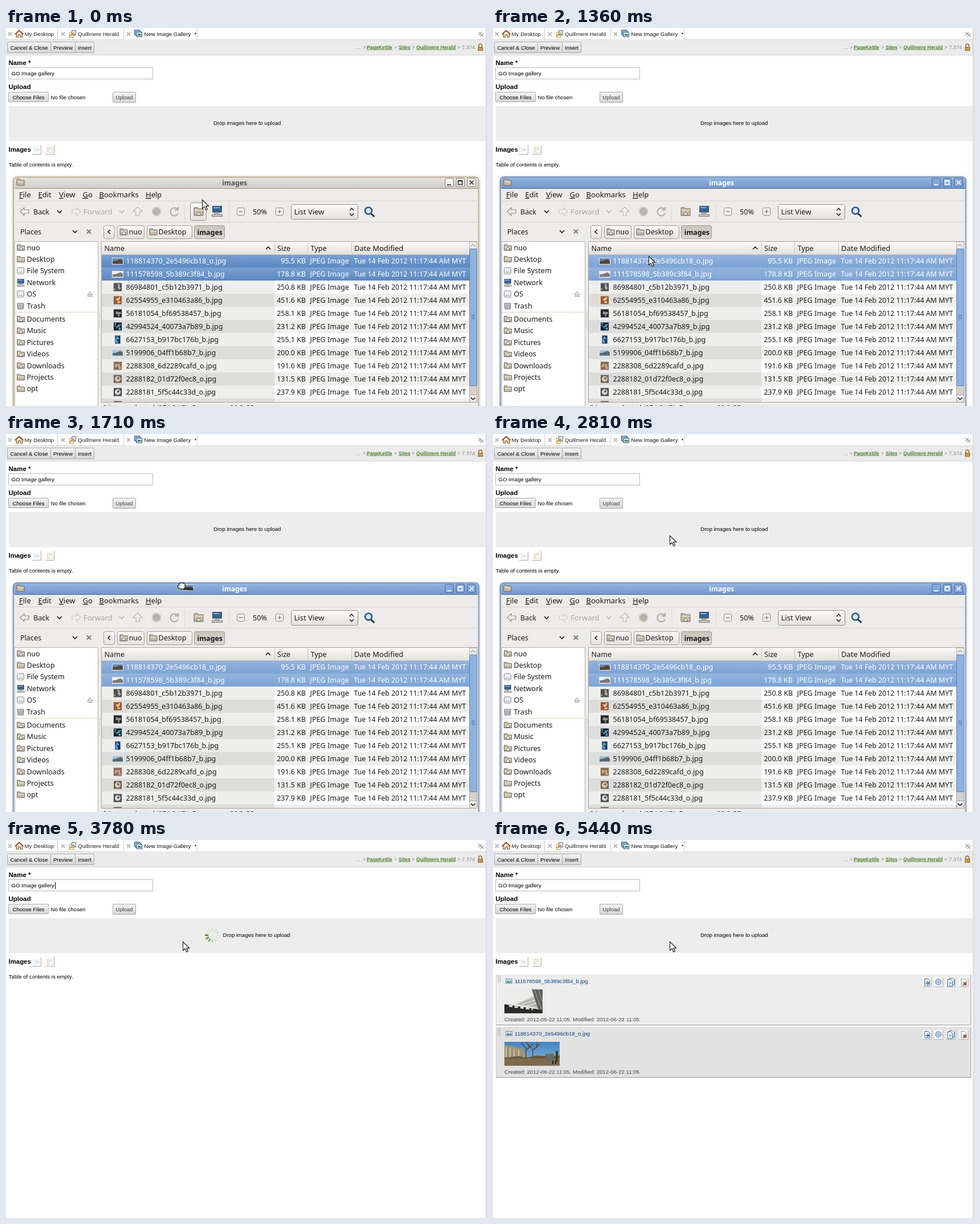
Animation of 844x663 px, one loop 5.82 s. Source, as an HTML page:

```html
<!DOCTYPE html>
<html lang="en">
<head>
<meta charset="utf-8">
<title>Image gallery upload</title>
<style>
html, body { margin: 0; width: 100%; height: 100%; overflow: hidden; background: #fff; }
svg { display: block; width: 844px; height: 663px; }
text { white-space: pre; font-family: "Liberation Sans", Arial, sans-serif; }
.ui text { font-family: "Noto Sans", "Open Sans", sans-serif; }
.bar { fill: url(#barIdle); }
.edge { stroke: #9d8f7c; }
.rim { stroke: #d9b98f; }
.sel { fill: url(#selIdle); }
.ctl { fill: #f4f1ec; stroke: #8f867a; }
.sign { stroke: #333; }
.title { fill: #55524d; }
.active .bar { fill: url(#barActive); }
.active .edge { stroke: #456491; }
.active .rim { stroke: #9dbbe2; }
.active .sel { fill: url(#selActive); }
.active .ctl { fill: #86a9da; stroke: #456a9c; }
.active .sign { stroke: #fff; }
.active .title { fill: #fff; }
</style>
</head>
<body>
<svg id="stage" viewBox="0 0 844 663"></svg>
<script>
const LOOP = 5820;
const INK = '#000', UI = '#1a1918';

const rect = (x, y, w, h, fill, stroke, more = '') =>
  `<rect x="${stroke ? x + .5 : x}" y="${stroke ? y + .5 : y}" width="${w}" height="${h}" fill="${fill}" stroke="${stroke || 'none'}" ${more}/>`;
const path = (d, stroke = 'none', width = 1, fill = 'none', more = '') =>
  `<path d="${d}" stroke="${stroke}" stroke-width="${width}" fill="${fill}" ${more}/>`;
const text = (x, y, s, size = 9.62, fill = INK, more = '') =>
  `<text x="${x}" y="${y}" font-size="${size}" fill="${fill}" ${more}>${s}</text>`;
const label = (x, y, s, fill = UI, more = '') => text(x, y, s, 12.6, fill, more);
const group = (s, more = '') => `<g ${more}>${s}</g>`;
const at = (x, y, s) => group(s, `transform="translate(${x} ${y})"`);
const circle = (x, y, r, fill, stroke = 'none', width = 1, more = '') =>
  `<circle cx="${x}" cy="${y}" r="${r}" fill="${fill}" stroke="${stroke}" stroke-width="${width}" ${more}/>`;
const gradient = (id, ...colors) =>
  `<linearGradient id="${id}" x2="0" y2="1">${colors.map((c, i) =>
    `<stop offset="${i / (colors.length - 1)}" stop-color="${c}"/>`).join('')}</linearGradient>`;
const cross = (x, y, r, color, w) =>
  path(`M${x - r} ${y - r}l${2 * r} ${2 * r}m0 ${-2 * r}l${-2 * r} ${2 * r}`, color, w);
const chevron = (x, y, color = UI, up = 1) => path(`M${x - 4} ${y - 2 * up}l4 ${4 * up}l4 ${-4 * up}`, color, 1.6);
const bold = 'font-weight="700"';

const defs = `<defs>
  ${gradient('barIdle', '#ebe8e4', '#dcd8d3', '#d2cdc7')}
  ${gradient('barActive', '#95b6e3', '#84a8d9', '#7498cb')}
  ${gradient('selIdle', '#7aa1d3', '#5b88c1')}
  ${gradient('selActive', '#94b4de', '#7da3d5')}
  ${gradient('button', '#f4f4f4', '#d6d6d6')}
  ${gradient('soft', '#fbfaf9', '#e4e1de')}
  ${gradient('pressed', '#c9c3bb', '#dcd7d0')}
  ${gradient('sky', '#3f83c4', '#94b9d6')}
  <clipPath id="rows"><rect x="168" y="375" width="645" height="281"/></clipPath>
</defs>`;

// Browser page
function button(x, y, w, h, s, color = INK) {
  return rect(x, y, w, h, 'url(#button)', '#aaa', 'rx="1.5"') +
    text(x + w / 2 + .5, y + h / 2 + 4, s, 9.62, color, 'text-anchor="middle"');
}
function iconButton(x, y, drawing) {
  return rect(x, y, 15, 16, '#fbfbfb') + path(`M${x} ${y + 16.5}h15.5v-16`, '#aaa') + at(x, y, drawing);
}
const house = path('M18 10v6h4v-4h3v4h4v-6', '#6a4526', 1, '#f3d3a8') + path('M16 11l7-6.5 7.5 6.5', '#9c3f1c', 2);
const sheets = rect(111, 7, 7, 9, '#fff4d0', '#cda052') + rect(115, 4, 7, 8, '#dbe9f7', '#4d7cae') + path('M112 14l6-5 3 3', '#de8b32', 2);
const gallery = rect(225, 3, 9, 8, '#cce0f4', '#285a96') + rect(227, 5, 9, 8, '#d9e9f8', '#285a96') +
  rect(229, 7, 9, 8, '#e9f2fb', '#285a96') + path('M231 13l2-3 2 2 2-1v2z', '#3e7b35', 1, '#3e7b35');
const lock = rect(828, 33, 8, 6, '#c49a53', '#957036') + path('M829.5 33v-2a2.8 3 0 0 1 5.6 0v2', '#957036', 1.5);
const crumb = (x, s) => text(x, 36.5, s, 8.65, '#4d842b', bold + ' text-decoration="underline"');
const angle = x => text(x, 36.5, '&gt;', 8.8, '#888');

const page = rect(0, 0, 844, 663, '#fff') +
  rect(0, 20, 842, 27, '#ebebeb') + path('M0 20.5H206M335 20.5H842M0 47.5H842', '#d4d4d4') +
  path('M90.5 1V20M206.5 1V20M335.5 1V20', '#ccc') +
  [7, 100, 215].map(x => cross(x, 10.5, 3, '#b6b6b6', 1.8)).join('') +
  house + sheets + gallery +
  text(32.5, 13.5, 'My Desktop', 9.75, '#222') + text(126, 13.5, 'Quillmere Herald', 9.62, '#222') +
  text(242.5, 13.5, 'New Image Gallery', 9.62, '#111') + text(330.5, 13.5, '*') +
  cross(832, 10, 3, '#aaa', 1.7) + cross(835, 12.5, 3, '#aaa', 1.4) +
  button(2, 24, 76, 19, 'Cancel &amp; Close') + button(78, 24, 43, 19, 'Preview') + button(121, 24, 33, 19, 'Insert') +
  text(615, 36.5, '...', 9, '#888') + angle(626) + crumb(633, 'PageKettle') + angle(681) + crumb(689, 'Sites') +
  angle(712) + crumb(720, 'Quillmere Herald') + angle(792) + text(800, 36.5, '7.374', 9.1, '#888') + lock +
  text(4.5, 65, 'Name *', 11.5, INK, bold) + rect(4, 69, 253, 20, '#fff', '#bbb') + text(9.5, 83, 'GO Image gallery') +
  text(4.5, 107, 'Upload', 11.5, INK, bold) + button(4, 112, 70, 17, 'Choose Files') +
  text(78.5, 125, 'No file chosen') + button(187, 112, 40, 18, 'Upload', '#444') +
  rect(4.5, 137, 837, 61.5, '#ededed', '', 'rx="2"') +
  text(4.5, 217, 'Images', 11.4, INK, bold) +
  iconButton(46, 205, path('M3 5l6 4m-6 3l6-4', '#cdd9e4', 1.3) + circle(10, 9, 2, 'none', '#c8d5e2')) +
  iconButton(69, 205, rect(3, 4, 7, 9, '#f8efd6', '#e7d5aa') + rect(6, 7, 6, 6, '#fff', '#ddd')) +
  path('M842.5 0V663', '#bbb');

// Uploaded images
const pageIcon = path('M3.5 2.5h6l3 3v8.5h-9z', '#42698f', 1, '#eaf3fc');
const tools = [
  pageIcon + path('M5 10h5m-2-3l3 3-3 2.5', '#2b67a8', 1.5),
  circle(7.5, 8, 4.5, '#cfdef0', '#5478a4', 1.2) + circle(7.5, 8, 5.6, 'none', '#7d9cc4', 1, 'stroke-dasharray="1.8 1.7"') + circle(7.5, 8, 1.6, '#fff', '#5478a4'),
  at(2, -1, pageIcon) + at(-1, 1, pageIcon) + path('M5 9h5m-5 2h5', '#6d94bd'),
  path('M3.5 2.5h6l3 3v8.5h-9z', '#8d8d8d', 1, '#fff') + cross(10, 11, 2.5, '#9a4018', 2)
];
function item(y, h, bg, name) {
  return rect(5, y, 833, h, bg) + path(`M5.5 ${y}V${y + h}`, '#ccc') + path(`M5 ${y + h + .5}H838.5V${y}`, '#999') +
    path(`M9.5 ${y + 2}v13m3-13v13`, '#999', 1.5, 'none', 'stroke-dasharray="1.5 1.5"') +
    rect(22, y + 7, 11, 8, '#bcdcf5', '#7d94a8') + path(`M23 ${y + 14}l3-3 3 2 3-2v3z`, 'none', 1, '#3d6f3b') +
    text(38, y + 14.5, name, 9.62, '#0f3f85') +
    text(20, y + 81.5, 'Created: 2012-06-22 11:05. Modified: 2012-06-22 11:05', 9.62, '#444') +
    tools.map((d, i) => iconButton([754, 774, 795, 818][i], y + 5, d)).join('');
}
const items = item(236, 88, '#ededed', '111578598_5b389c3f84_b.jpg') + item(328, 88, '#e2e2e2', '118814370_2e5496cb18_o.jpg');
const photoRoof = at(20, 262, rect(0, 0, 67, 42, '#ececea') + path('M67 4L20 26l47 8z', 'none', 1, '#b5b5b1') +
  path('M22 25L67 6M30 27l37-13M40 29l27-8', '#dededa', 1.5) + path('M0 26L67 36v6H0z', 'none', 1, '#2b2b28') +
  path('M8 29l42 6', '#e6e6e4', 3, 'none', 'stroke-dasharray="6 4"') + path('M48 0l12 36 7 1V0z', 'none', 1, '#5f605c') +
  path('M53 1l12 33M59 0l8 22', '#b4b4b0'));
const photoPark = at(20, 354, rect(0, 0, 97, 42, 'url(#sky)') + path('M0 5l32 7 8 16H0z', 'none', 1, '#9b9275') +
  path('M3 9v18m7-17v17m7-15v15m8-13v13', '#cfc3a8', 2) + rect(0, 27, 97, 15, '#7f6a4d') +
  path('M38 30V11l-9-9m9 13l13-12M50 29V13l-9-7m9 9l12-11M44 8l-6-8m18 10l2-9', '#54452f', 1.5) +
  path('M0 28l25-3 12 3 20-4 20 1 20-1v5H0z', 'none', 1, '#67573b') + rect(72, 21, 15, 14, '#6b695f') +
  path('M92 35V16', '#36402c', 4) + path('M85 33v6m5-6v6', '#29251f', 2));

// File manager
const folder = (x, y, w = 13, h = 11) => path(`M${x} ${y + h}v${-h}h${w * .4}l1.5 2h${w * .6 - 1.5}v${h - 2}z`, '#6f675a', 1, '#c4b9a6') +
  path(`M${x + 1} ${y + 4.5}h${w - 2}`, '#ece4d6', 1.5);
const homeFolder = (x, y, w, h) => folder(x, y, w, h) + path(`M${x + w / 2 - 3} ${y + h - 3}l3-3 3 3v2h-6z`, '#6b6253', 1, '#fff');
const computer = (x, y, k) => at(x, y, group(rect(1, 0, 15, 10, '#326399', '#4d4d4d') + path('M3 3h10', '#84afe0', 2) +
  rect(4, 12, 9, 1, '#666') + rect(0, 14, 17, 3, '#d3d1cd', '#777'), `transform="scale(${k})"`));
const drive = (x, y) => rect(x, y, 12, 11, '#efeeec', '#888', 'rx="2"') + path(`M${x + 2} ${y + 8.5}h9`, '#999');
const trash = (x, y) => path(`M${x + 1} ${y + 2}h11l-1 10h-9z`, '#666', 1, '#d2d5d3') + path(`M${x + 4} ${y + 4}v7m3-7v7m3-7v7`, '#777');

const places = ['nuo', 'Desktop', 'File System', 'Network', 'OS', 'Trash', 'Documents', 'Music', 'Pictures', 'Videos', 'Downloads', 'Projects', 'opt'];
const sidebar = rect(15, 374, 146, 300, '#fff', '#b7b1aa') + path('M16 498.5H160', '#ded3c3') +
  places.map((name, i) => {
    const y = (i < 6 ? 385 : 388.2) + i * 20.38;
    const icon = i == 2 || i == 4 ? drive(19, y - 6) : i == 3 ? computer(19, y - 6, .75) :
      i == 5 ? trash(19, y - 6) : (i < 1 || (i > 5 && i < 11) ? homeFolder : folder)(19.5, y - 5, 13, 10);
    return icon + label(36.5, y + 4.6, name);
  }).join('') + path('M143 468l4.5-5.5 4.5 5.5zM143 470.5h9', '#888', 1, '#eee');

const files = [
  ['118814370_2e5496cb18_o', '95.5', '#6189b4', '#57452f'], ['111578598_5b389c3f84_b', '178.8', '#f0f0ee', '#77787a'],
  ['86984801_c5b12b3971_b', '250.8', '#50504f', '#aaa'], ['62554955_e310463a86_b', '451.6', '#9b572d', '#e9cdaa'],
  ['56181054_bf69538457_b', '258.1', '#25282c', '#929aa0'], ['42994524_40073a7b89_b', '231.2', '#10161f', '#54aacd'],
  ['6627153_b917bc176b_b', '255.1', '#14304f', '#4fa1e1'], ['5199906_04ff1b68b7_b', '200.0', '#9ec3db', '#536a70'],
  ['2288308_6d2289cafd_o', '191.6', '#8e6a51', '#c3aa91'], ['2288182_01d72f0ec8_o', '131.5', '#756350', '#d6cabb'],
  ['2288181_5f5c44c33d_o', '237.9', '#4b5051', '#d5dad8'], ['', '', '#625347', '#999']
];
let seed = 7;
const random = () => (seed = seed * 16807 % 2147483647) / 2147483647;
function thumb(x, y, i) {
  const [, , back, front] = files[i];
  if (i < 2 || i == 7) return rect(x - 10, y - 5.5, 19, 11, back, '#e6e6e6') + path(`M${x - 9} ${y + 5}v-4l6-1 8-3 4 3v5z`, 'none', 1, front);
  const w = i == 6 ? 10 : 15;
  const dabs = Array.from({ length: 7 }, () => rect(x - w / 2 + 1 + random() * (w - 6), y - 6 + random() * 9, 2 + random() * 2, 2 + random() * 2, front));
  const shape = i > 8 ? circle(x, y, 5, front) + circle(x + 1, y - 1, 2, back) : dabs.join('');
  return rect(x - w / 2 - .5, y - 8, w, 15, back, '#d8d8d8') + shape;
}
const rows = files.map(([name, size], i) => {
  const y = 397 + i * 23, ink = i < 2 ? '#fff' : UI, odd = i % 2;
  const back = i < 2 ? rect(168, y, 645, 23, '', '', 'class="sel"') :
    rect(168, y, 303, 23, odd ? '#dddddc' : '#eeeeed') + rect(471, y, 342, 23, odd ? '#efefee' : '#fff');
  return back + thumb(196, y + 11.5, i) + (name && text(210.5, y + 15.8, name + '.jpg', 12.5, ink) +
    text(526, y + 15.8, size + ' KB', 12.45, ink, 'text-anchor="end"') + text(533.5, y + 15.8, 'JPEG Image', 12.6, ink) +
    text(610.5, y + 15.8, 'Tue 14 Feb 2012 11:17:44 AM MYT', 12.35, ink));
}).join('');
const list = rect(167, 374, 659, 282, '#fff', '#aaa39b') + group(rows, 'clip-path="url(#rows)"') +
  rect(168, 375, 645, 22, 'url(#soft)') + path('M168 397.5H813M471.5 376V396M529.5 376V396M606.5 376V396', '#c6c2bd') +
  label(172.5, 390.5, 'Name') + label(476, 390.5, 'Size') + label(534.5, 390.5, 'Type') + text(611, 390.5, 'Date Modified', 13, UI) + chevron(460, 386, UI, -1) +
  rect(813, 375, 13, 281, '#d6d2cd', '#aaa39b') + rect(813, 375, 13, 12, 'url(#soft)', '#bbb4ac') + chevron(819.5, 381, '#aaa', -.8) +
  rect(813, 387, 13, 240, '#8eb1df', '#5d83b4', 'rx="1"') + path('M817 503.5h6m-6 3h6m-6 3h6', '#4a709f') +
  rect(813, 643, 13, 13, 'url(#soft)', '#a49c93') + chevron(819.5, 650, UI, .8) +
  path('M164.5 500v29', '#aaa49d', 1.5, 'none', 'stroke-dasharray="1.5 2.5"');

const arrow = (x, color, dir) => path(`M${x} 322l${7 * dir}-7v4h${8 * dir}v6h${-8 * dir}v4z`, color, 1.2, '#f1efec', 'stroke-dasharray="2 .5"');
const menus = [[23, 'File'], [56.5, 'Edit'], [93, 'View'], [134.5, 'Go'], [163.5, 'Bookmarks'], [245, 'Help']];
const toolbar = menus.map(([x, s]) =>
    text(x, 297, `<tspan text-decoration="underline">${s[0]}</tspan>${s.slice(1)}`, 13, UI)).join('') +
  path('M16 303.5H827', '#d6d2ce') + path('M16 340.5H827', '#d6d2ce') +
  arrow(25, '#77736e', 1) + label(48, 326.5, 'Back') + chevron(94, 322) + arrow(131, '#c2beb9', -1) +
  text(136, 326.5, 'Forward', 13, '#aaa6a1') + chevron(203, 322, '#b5b1ac') +
  path('M231 314l8 8h-5v7h-6v-7h-5z', '#a5a19c', 1.2, '#f3f2f0', 'stroke-dasharray="2 .5"') +
  circle(264, 322, 7.5, '#b9b2ac', '#d3cfca', 2) + path('M301 318a7 7 0 1 0 1 7M302 314v5h-6', '#b4b0ab', 2.4) +
  path('M313.5 308v29M391.5 308v29', '#dbd8d4') +
  rect(323, 306, 28, 31, 'url(#soft)', '#958d83', 'rx="3" id="hover"') + homeFolder(330, 315, 16, 14) + computer(361, 312, 1.05) +
  [412, 480].map((x, i) => rect(x - 7, 315, 13, 13, '#f5f4f2', '#8a8680', 'rx="2"') + path(`M${x - 3.5} 322h7${i ? 'm-3.5-3.5v7' : ''}`, '#666', 1.2)).join('') +
  label(433, 327, '50%') + rect(500, 309, 117, 26, 'url(#soft)', '#928b83', 'rx="3"') + text(505.5, 327, 'List View', 13, UI) +
  path('M603 320l3.5-4 3.5 4M603 325l3.5 4 3.5-4', UI, 1.4) +
  circle(636, 320.5, 6, '#dbe8f5', '#25578f', 2.5) + path('M640.5 325.5l6 5.5', '#27364a', 3);
const pathButton = (x, w, fill, content) => rect(x, 346, w, 23, fill, '#a29a91', 'rx="3"') + content;
const pathBar = label(25, 362, 'Places') + chevron(121, 357) + cross(145.5, 357, 3.5, '#77736e', 1.8) +
  pathButton(171, 19, 'url(#soft)', path('M183 354l-4 3.5 4 3.5', UI, 1.6)) +
  pathButton(195, 47, 'url(#soft)', homeFolder(200, 352, 13, 11) + label(215.5, 362, 'nuo')) +
  pathButton(247, 79, 'url(#soft)', folder(252, 352, 13, 11) + label(267.5, 362, 'Desktop')) +
  pathButton(330, 53, 'url(#pressed)', text(335.5, 362.5, 'images', 12.3, UI, bold));
const signs = ['M774 275h7', 'M793.5 267.5h7v7h-7zM793.5 268.5h7', 'M813.5 267.5l7 7m0-7l-7 7'];
const controls = signs.map((d, i) => `<rect class="ctl" x="${770.5 + i * 19.5}" y="263.5" width="14.5" height="14.5" rx="2"/>` +
  path(d, '', 1.6, 'none', 'class="sign"').replace('stroke=""', '')).join('');

const frame = 'M12.5 670V268q0-7 7-7H823q7 0 7 7V670';
const fileManager = [3, 2, 1].map(d => rect(12 - d, 261 - d, 818 + 2 * d, 420, 'none', '#000', 'rx="8" stroke-opacity=".05"')).join('') +
  path(frame, 'none', 1, '#eeecea') +
  `<path d="M12.5 281V268q0-7 7-7H823q7 0 7 7V281z" class="bar"/>
   <path d="${frame}M15 281.5H828" class="edge" fill="none"/>
   <path d="M14 670V268q0-5.5 6-5.5H823q5.5 0 5.5 5.5V670" fill="none" class="rim"/>` +
  folder(19, 265, 13, 11) + `<text x="379" y="275.5" font-size="12.2" class="title" ${bold}>images</text>` + controls +
  toolbar + pathBar + sidebar + list +
  text(170, 670.5, '2 items selected (274.3 KB), Free space: 20.2 GB', 12, UI) +
  rect(168, 398, 643, 256, 'none', '#111', 'id="dropFrame"');

const spokes = Array.from({ length: 12 }, (_, i) =>
  `<path class="spoke" d="M0-7V-13" stroke-width="2.6" transform="rotate(${i * 30})"/>`).join('');
const pointer = path('M0 0V15.2l3.6-3.3 2.7 6 2.5-1.1-2.7-5.8h5z', '#111', 1.1, '#fff');
const hand = rect(1, -3.5, 19, 10, '#5f87b1', '#ddd') + path('M2 6V3l7-2 7 0 4 2v4z', 'none', 1, '#2f302c') +
  path('M-7 1q-1-3 2-3v-2q0-2 2-1.5 1-1.5 3-.5 2-1 3 .8 2.5-.3 2.5 2V1L4 4H-4z', '#111', 1.1, '#fff');

const stage = document.getElementById('stage');
stage.innerHTML = defs + page +
  text(364, 170, 'Drop images here to upload', 9.6, INK, 'id="prompt"') +
  text(4.5, 243, 'Table of contents is empty.', 9.62, INK, 'id="empty"') +
  rect(86, 74, 1, 12, '#000', '', 'id="caret"') +
  at(362, 167, group(spokes, 'id="spinner"')) +
  group(items, 'id="items"') + group(photoRoof, 'id="roof"') + group(photoPark, 'id="park"') +
  group(fileManager, 'id="manager" class="ui"') +
  group(group(pointer, 'id="pointer"') + group(hand, 'id="hand"'), 'id="cursor"');

const el = id => document.getElementById(id);
const show = (id, on) => el(id).setAttribute('visibility', on ? 'visible' : 'hidden');
const within = (t, a, b) => t >= a && t < b;

// time, x, y
const trail = [
  [0, 344, 301], [50, 344, 301], [170, 348, 274], [310, 348, 273], [460, 348, 273], [860, 270, 405], [900, 270, 405],
  [1020, 269, 398], [1320, 269, 398], [1360, 273, 400], [1400, 273, 400], [1710, 308, 267], [1750, 308, 267],
  [1880, 311, 205], [1920, 311, 205], [2120, 311, 181], [2809, 311, 181], [2810, 310, 178], [LOOP, 310, 178]
];
function cursorAt(t) {
  const i = trail.findIndex(p => p[0] > t);
  const [t0, x0, y0] = trail[i - 1], [t1, x1, y1] = trail[i];
  const k = (t - t0) / (t1 - t0);
  return `translate(${Math.round(x0 + (x1 - x0) * k) + .5} ${Math.round(y0 + (y1 - y0) * k) + .5})`;
}
const greens = ['#43851a', '#5a9632', '#86b369', '#b4d0a2'];
const spokeList = [...document.querySelectorAll('.spoke')];

function render(t) {
  const dragging = within(t, 1400, 2810), uploading = within(t, 2980, 5320);
  el('cursor').setAttribute('transform', cursorAt(t));
  show('pointer', !dragging);
  show('hand', dragging);
  show('hover', t < 90);
  show('dropFrame', within(t, 1400, 1480));
  el('manager').classList.toggle('active', within(t, 310, 2980));
  el('manager').setAttribute('opacity', t < 2980 ? 1 : Math.max(0, .8 - .2 * Math.floor((t - 2980) / 75)));
  el('prompt').setAttribute('x', uploading ? 380.5 : 364);
  show('spinner', uploading);
  show('caret', within(t, 2980, 3180) || within(t, 3600, 4100) || within(t, 4600, 5100));
  show('empty', t < 5320);
  show('items', t >= 5320);
  show('roof', t >= 5360);
  show('park', t >= 5400);
  const head = 9 + Math.floor((t - 3780) / 76);
  spokeList.forEach((s, i) => s.setAttribute('stroke', greens[(head - i + 120) % 12] || '#d8e7cf'));
}

const start = performance.now();
function tick() {
  render((performance.now() - start) % LOOP);
  requestAnimationFrame(tick);
}
tick();
</script>
</body>
</html>
```
